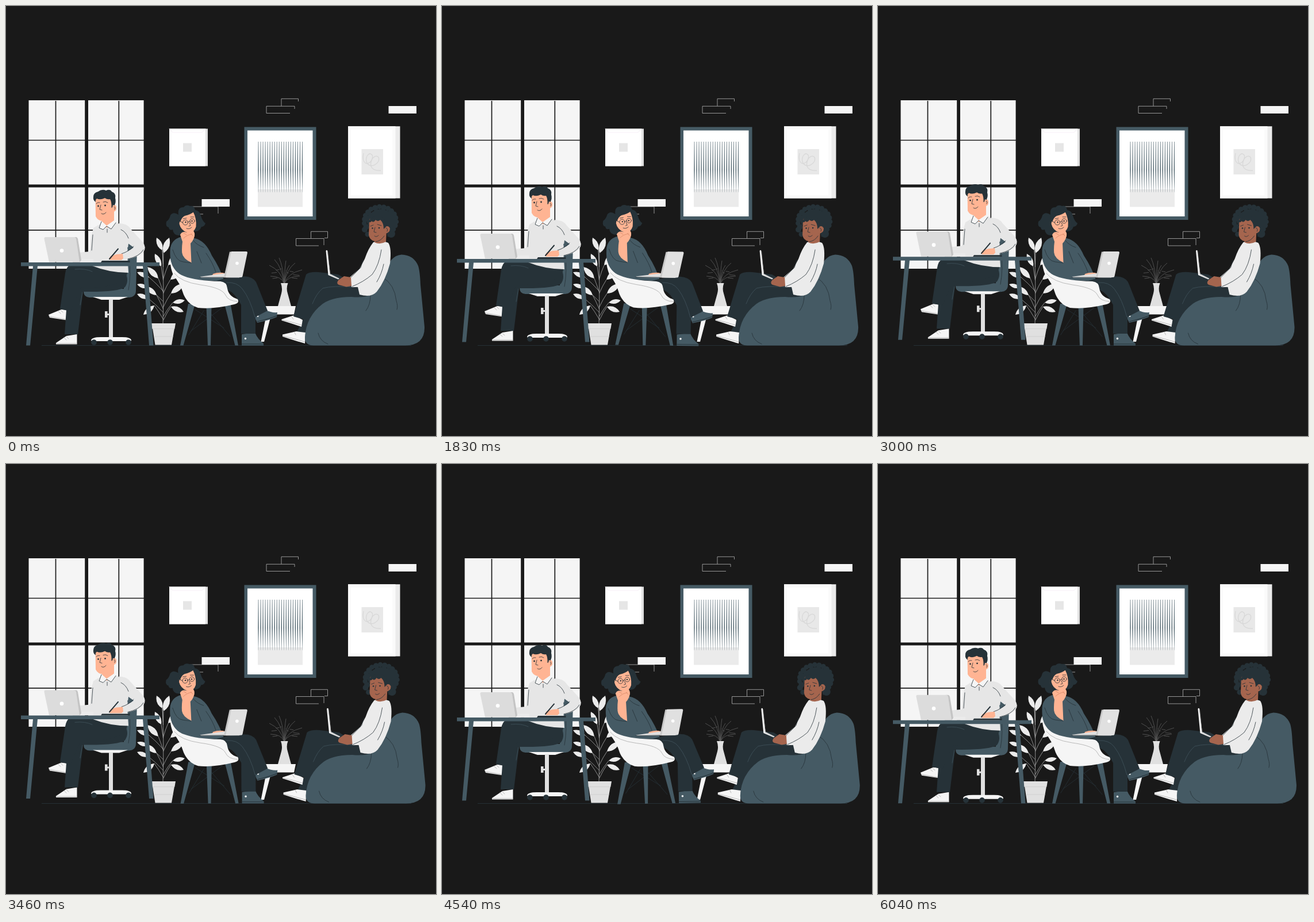
An HTML page that plays this animation: 748x748 px, repeating every 6.08 s.

```html
<!DOCTYPE html>
<html lang="en">
<head>
<meta charset="utf-8">
<title>Coworking</title>
<style>
  html, body { margin: 0; width: 100%; height: 100%; overflow: hidden; background: #191919; }
  svg { display: block; width: 100%; height: 100%; }
  .slate { fill: #455a64; } .dark { fill: #263238; }
  .white { fill: #f5f5f5; } .pale { fill: #ebebeb; } .grey { fill: #e0e0e0; } .shirt { fill: #e6e6e6; }
  .skin { fill: #ffb493; } .brown { fill: #a5654e; } .pure { fill: #fff; }
  .line { fill: none; stroke: #263238; stroke-width: .8; stroke-linecap: round; stroke-linejoin: round; }
  .soft { stroke: #aaa; } .seam { stroke: #41535c; } .blush { stroke: #d88968; }
  .brick { fill: none; stroke: #b5b5b5; stroke-width: .8; }
</style>
</head>
<body>
<svg viewBox="0 0 748 748">
  <!-- window -->
  <path class="white" d="M39.5 164H137.2V310.5H39.5zM143 164H239.6V310.5H143zM39.5 315.5H137.2V457H39.5zM143 315.5H239.6V457H143z"/>
  <path stroke="#191919" stroke-width="1.7" d="M86.5 165V457M196.3 165V457M39 233.5H240M39 389.8H240"/>

  <!-- bricks -->
  <path class="brick" d="M479 174V161.3H508.5V166M453 186.5V174.3H502V179M453 186.5H494M530.5 404V392.3H559.5V403.5H554M504.5 417V404.5H553V416M504.5 417H544M320 361V349H369V361M329 362H343"/>
  <path class="white" d="M665.5 174H714V187H665.5zM340.5 336H389V349H340.5z"/>

  <!-- pictures -->
  <path class="grey" d="M284 213.5H351V278.5H284z"/>
  <path class="pure" d="M284 213.5H347V278.5H284z"/>
  <path fill="none" stroke="#f6eff6" d="M284 213.5L290 220H341L347 213.5"/>
  <path fill="#e6e6e6" d="M308 238.5H323V253.5H308z"/>

  <path class="slate" d="M414.5 210.5H539.5V372H414.5z"/>
  <path class="pure" d="M420 216.5H533.5V366H420z"/>
  <path class="pale" d="M438 319H516V349.5H438z"/>
  <path class="slate" id="spikes"/>

  <path class="pale" d="M595 209.3H685.5V334.5H595z"/>
  <path fill="#fafafa" d="M595 209.3H677.5V334.5H595z"/>
  <path class="pure" d="M600 215H672V329H600z"/>
  <path fill="#e8e8e8" d="M618.5 249H656V293H618.5z"/>
  <path fill="none" stroke="#d8d8d8" stroke-width="1.3" d="M622 256C618 275 630 279 636 268C642 257 630 252 627 264C624 280 641 282 648 270C652 258 638 258 635 271C632 284 643 287 652 286"/>

  <path stroke="#263238" stroke-width=".9" d="M62 590.5H705"/>

  <!-- plant -->
  <path id="stems" fill="none" stroke="#bdbdbd" stroke-width=".7"/>
  <path id="leaves" class="pale"/>
  <path class="grey" d="M252.500 552H295L293.500 561H254zM255 561H293L288 589.500H259.500z"/>
  <path stroke="#c9c9c9" stroke-width=".7" d="M254 561.500H293.500M257 575H291"/>

  <!-- side table -->
  <path id="twigs" fill="none" stroke="#5c5c5c" stroke-width=".8"/>
  <path class="white" d="M450 522H504L501 536.500H461.500L449 584H443.500L453 536.500L447 531z"/>
  <path class="grey" d="M478 482H490.500Q487 491 490 500L496 522H473L479 500Q481.500 491 478 482z"/>

  <!-- man at the desk -->
  <g id="man">
    <path class="slate" d="M207 414Q210 404 219 406Q229 409 228 422L226 495Q226 506 214 507H145Q135 506 135 497Q150 490 205 492z"/>
    <path class="line" d="M213 494Q218 470 214 430"/>
    <path class="white" d="M151 506H212L197 511H166z"/>
    <path class="grey" d="M179 510H186V580H179zM172 531H176.500V535H180V538H176.500V542H172z"/>
    <path class="white" d="M148 581.500Q149 576 165 576H202Q217 576 218 581.500L217 583H149z"/>
    <path class="dark" id="wheels"/>
    <path class="white" d="M87 586L105 574L123.500 571V588.500H87zM74 537L96 528L111 529L115 548L76 542z"/>
    <path class="line soft" d="M101 577l4 4M105 575l4 4M91 531l4 4M95 529l4 4M87 587H123M75 540L114 547"/>
    <path class="dark" d="M128 460H205Q216 476 207 489Q195 498 134 497L125 571H102L107 500z"/>
    <path class="dark" d="M112 450H212Q214 470 201 480Q170 492 136 490Q131 488 129 492L112 531L94 527L103 465Q105 453 112 450z"/>
    <path class="line seam" d="M133 498L129 520M120 458Q138 456 150 462"/>
    <!-- far arm and torso -->
    <path class="shirt" d="M152 388Q147 398 146 427L126 429V441L150 447Q158 430 158 410z"/>
    <path class="shirt" d="M166 378L152 386Q148 400 149 425L150 452Q180 464 213 464L211 430L214 405L205 382L188 376z"/>
    <path class="slate" d="M211 420L224 417L214 434z"/>
    <path class="shirt" d="M196 378Q211 378 217 388L238 411Q245 420 239 428Q230 438 202 442L200 430Q212 428 222 420L207 409z"/>
    <path class="line" d="M200 389Q209 393 213 404M222 418Q214 427 201 431M149 425L151 398M239 424Q232 436 212 440"/>
    <!-- head -->
    <path class="skin" d="M166 368L168 382Q177 390 188 378V352z"/>
    <path class="white" d="M166 374L162 386L169 389L175 383L183 388L191 377L188 373L175 382z"/>
    <path class="line" d="M166 375L162 386L169 389L175 383L183 388L191 377M176 388V394"/>
    <path class="skin" d="M155.500 332L156 366Q160 374 169 374Q183 371 187 358Q193 357 192 349Q190 344 186 347L184 330Q170 326 155.500 332z"/>
    <path class="dark" d="M156 341Q151 338 152 332Q152 325 160 323Q167 318 174 321Q181 318 184 323Q192 326 190 334Q192 341 188.500 347L186 346Q185.500 351 183.500 351Q184 341 181 336Q176 337 172 334Q164 338 158 335Q155 337 156 341z"/>
    <path class="line" d="M157 344Q159 341 163 342M169 341Q173 339 177 342M165 346L163 354L167 355M166 361Q170 364 174 359M188 349Q191 350 189 354"/>
    <circle class="dark" cx="160.500" cy="348" r="1.400"/><circle class="dark" cx="172.500" cy="347" r="1.400"/>
    <!-- laptop and writing hand -->
    <path class="pale" d="M128 440H152V446H128z"/>
    <path fill="#c4c4c4" d="M118 402H122Q124 402 125 405L131 442L128 446H116z"/>
    <path fill="#dcdcdc" d="M69 402H119Q121 402 122 405L128 445.500H75L66.500 405Q66 402 69 402z"/>
    <circle class="pure" cx="97" cy="425.500" r="3.300"/>
    <path class="skin" d="M203 431L192 432L182 435Q178 439 181 442H201L204 439z"/>
    <path class="line" style="stroke-width:2" d="M195 422.500L180 440"/>
    <path class="dark" d="M167 443H215V446H165z"/>
    <!-- desk -->
    <path class="slate" d="M26 446H267V452.500H26zM47 452H55L42 590.500H35zM238 452H246L256.500 590.500H249z"/>
  </g>

  <!-- woman in the shell chair -->
  <g id="woman">
    <path class="line" d="M329 528L379 560M376 525L322 565M352 530L390 575M344 530L318 572"/>
    <path class="slate" d="M317 518H329L308.500 590.500H303zM348.500 522H357.500L356 590.500H351zM380 518H390.500L404 590.500H398.500z"/>
    <path class="slate" d="M410 571L433 568Q438 580 448 587V590.500H410zM431 538L452 529Q462 534 472 533L471 541Q460 546 437 551z"/>
    <path fill="none" stroke="#263238" d="M410 588H448M437 549Q458 544 471 539"/>
    <circle class="white" cx="416.500" cy="578.500" r="1.800"/><circle class="white" cx="438" cy="539.500" r="1.500"/>
    <!-- torso -->
    <path class="slate" d="M303 402Q287 407 285.500 424Q285 442 288 448Q296 468 312 476L380 479Q372 455 358 434Q347 408 328 404z"/>
    <path class="dark" d="M366 478Q400 468 421 471Q434 474 437 485L455 530L434 541V570H409V520Q396 495 382 493L362 488z"/>
    <path class="line seam" d="M384 481Q402 480 411 492Q425 510 433 541"/>
    <path class="white" d="M286 442Q292 464 310 470Q330 478 373 479Q384 480 385 491Q387 505 403 510Q407 517 397 519Q360 528 334 525Q317 520 309 502Q303 482 291 468Q285 453 286 442z"/>
    <path class="line soft" d="M293 465Q304 480 338 485Q376 490 382 503Q386 513 403 514"/>
    <!-- head -->
    <path class="dark" d="M300 363Q298 350 309 350Q313 345 320 348Q327 346 329 355Q337 356 339 365Q342 375 347 378Q345 384 340 384Q336 395 323 391L304 399Q291 400 290 389Q284 391 283 385Q277 384 279 375Q284 372 286 364Q291 357 300 363z"/>
    <path class="skin" d="M303 368Q312 364 325 357Q332 370 330.500 384Q327 396 315 394Q304 390 301.500 379z"/>
    <path class="dark" d="M303 376Q297 365 305 358Q315 350 328 357Q321 363 311 365Q306 367 303 376z"/>
    <g class="line">
      <circle cx="312" cy="376.500" r="4.500"/><circle cx="324" cy="374" r="4"/>
      <path d="M316.500 375.500L320 374.500M307.500 377L302 374M308 370L314 369M321 367L327 367M319 377L321 382L318 383M314 387Q319 389 323 385"/>
    </g>
    <circle class="dark" cx="312.500" cy="376" r="1.200"/><circle class="dark" cx="323.500" cy="374" r="1.200"/>
    <!-- resting arm -->
    <path class="skin" d="M303 398Q306 391 315 394L325 390Q329 394 328 400Q326 408 321 413L322.500 447L307 438Q305 424 307 410z"/>
    <path class="line blush" d="M309 404Q315 398 323 397M314 398L309 395M322 396L325 400"/>
    <path class="slate" d="M290 420L306 429Q308 440 322 446Q323 460 310 458Q296 450 290 437z"/>
    <path class="line" d="M290 424Q296 444 308 445L322 447M326 408Q332 416 344 420M332 427L340 447M348 430Q360 447 365 463"/>
    <path class="skin" d="M360 466Q371 462 381 465V471H358z"/>
    <!-- laptop -->
    <path class="grey" d="M337 471L381 465L408 470L406 472.500H340z"/>
    <path class="line" d="M337 472H382"/>
    <path fill="#c8c8c8" d="M389 427.500H416L406 472H379z"/>
    <path class="grey" d="M392 427H418Q420 427 420 429L411.500 470Q411 472 409 472H382z"/>
    <circle class="pure" cx="402" cy="447.500" r="2.800"/>
  </g>

  <!-- person on the beanbag -->
  <g id="guest">
    <path class="dark" d="M633 489L630 508Q580 512 550 535L521 572L506 567L528 523L560 490z"/>
    <path class="white" d="M479.500 545L501 538L516 546L514 558Q496 552 479.500 547zM481 571.500L505 566L521 568L520 587Q502 582 481 575z"/>
    <path class="line soft" d="M481 546Q498 550 514 555M482 574Q502 579 519 584M497 541l3 4M502 568l2 4"/>
    <path class="dark" d="M522 467Q528 462 544 463L578 467L610 487L637 499Q605 509 575 506L540 525L517 545L500 540z"/>
    <path class="line seam" d="M606 489Q568 486 551 491Q540 500 533 518"/>
    <path class="slate" d="M520 576Q522 540 551 518Q568 506 601 506Q624 508 634 502Q650 495 656 469Q667 434 688 432.500Q709 433 717 452Q720 461 721 485L728 558Q729 590.500 694 590.500H537Q519 591 520 576z"/>
    <path class="line" d="M634 503Q634 520 626 530M655 472Q676 484 679 513Q682 522 680 528M543 569Q546 583 560 588"/>
    <!-- torso and arm -->
    <path class="pale" d="M639 411Q630 422 624 440L615 457L598 472L601 489L612 489L615 502Q635 508 645 497Q660 478 668 448Q671 420 665 412Q652 406 639 411z"/>
    <path class="line" d="M653 424Q649 451 637 467Q622 480 602 488M599 473L617 455L621 442M645 480Q654 465 657 449"/>
    <path class="brown" d="M600 472L588 470L578 477Q574 483 579 485L592 488.500L601 487z"/>
    <!-- head -->
    <path class="dark" id="curls"/>
    <path class="brown" d="M642 397L641 411Q650 416 661 410L662 388z"/>
    <path class="brown" d="M632 371Q645 364 658 376L658 385Q665 380 668 387Q668 395 659 396Q655 408 641 409Q632 407 631 398z"/>
    <path class="dark" d="M630 375Q636 363 652 366Q663 372 661 384L657 388Q657 377 651 372Q647 376 643 372Q639 378 636 374Q634 378 630 375z"/>
    <path class="line" d="M634 383L639 381M646 380L653 382M642 385L640 393L644 394M641 400Q644 403 648 399M661 386Q665 387 663 392M643 410Q652 409 658 400"/>
    <circle class="dark" cx="637.500" cy="386.500" r="1.300"/><circle class="dark" cx="649" cy="386" r="1.300"/>
    <!-- laptop -->
    <path class="white" d="M556.500 426Q557 424 559 425L564 466L580 474L578 475.500L560.500 468z"/>
    <path class="line soft" d="M559.500 427L563.500 467L578 474"/>
  </g>
</svg>
<script>
const el = id => document.getElementById(id);
const draw = (id, d) => el(id).setAttribute('d', d);
const range = (n, f) => Array.from({ length: n }, (_, i) => f(i)).join('');
const ball = (x, y, r) => `M${x - r} ${y}a${r} ${r} 0 1 1 ${2 * r} 0a${r} ${r} 0 1 1 ${-2 * r} 0`;

draw('spikes', range(20, i => {
  const x = 439 + i * 4.02;
  return `M${x - .3} 236h.6L${x + .7} 285L${x + .1} 324h-.2L${x - .7} 285z`;
}));

// Each leaf runs from its base to its tip.
const leaf = ([x, y, u, v]) => {
  const dx = u - x, dy = v - y, mx = x + dx * .5, my = y + dy * .5, w = .36;
  return `M${x} ${y}Q${mx - dy * w} ${my + dx * w} ${u} ${v}Q${mx + dy * w} ${my - dx * w} ${x} ${y}z`;
};
const leaves = [
  [272, 425, 262, 403], [274, 430, 284, 403], [270, 453, 259, 431],
  [282, 451, 301, 429], [265, 474, 246, 454], [286, 476, 308, 458],
  [249, 472, 228, 463], [287, 500, 309, 483], [247, 490, 228, 484],
  [248, 509, 228, 501], [262, 503, 243, 488], [290, 516, 311, 512],
  [287, 523, 309, 532], [258, 521, 239, 537]
];
draw('leaves', leaves.map(leaf).join(''));
draw('stems', 'M273 553Q275 480 272 420' + leaves.map(([x, y]) =>
  `M273.500 ${Math.min(y + 24, 548)}Q${(x + 273) / 2} ${y + 10} ${x} ${y}`).join(''));

draw('twigs', [[458, 451], [460, 470], [467, 441], [475, 438], [487, 443], [503, 447], [515, 459], [511, 470], [493, 451]]
  .map(([x, y]) => {
    const mx = (x + 484) / 2, my = (y + 482) / 2 - 6;
    return `M484 483Q${484 + (x - 484) * .2} ${my} ${x} ${y}M${mx} ${my + 3}l${(x - 484) * .35} 1`;
  }).join(''));

draw('wheels', [153, 181, 213].map(x => ball(x, 585, 4.8)).join(''));

draw('curls', 'M625 370Q650 338 677 367Q684 390 664 402L658 378L630 381z' + range(16, i => {
  const a = (155 + i * 16) * Math.PI / 180, r = i % 2;
  return ball(651 + (27 + r) * Math.cos(a), 374 + (24 + r) * Math.sin(a), 5 - r * .7);
}) + ball(624, 389, 5) + ball(629, 397, 4.5) + ball(670, 396, 7));

const LOOP = 6080;
// Linear interpolation through [share of loop, value] keys.
const track = (keys, p) => {
  const i = keys.findIndex(k => k[0] > p);
  const [a, u] = keys[i - 1], [b, v] = keys[i];
  return u + (v - u) * (p - a) / (b - a);
};
const lift = [[0, 0], [.5, -10], [1, 0]];
const sway = [[0, 0], [.25, 1], [.75, -1], [1, 0]];
const shake = [0, -1, 2, -4, 4, -4, 4, -4, 2, -1, 0].map((x, i) => [i / 10, x]);
const start = performance.now();

function frame() {
  const p = (performance.now() - start) % LOOP / LOOP;
  el('man').setAttribute('transform', `translate(0 ${track(lift, p)})`);
  el('woman').setAttribute('transform', `rotate(${track(sway, p)} 375 468)`);
  el('guest').setAttribute('transform', `translate(${track(shake, p)} 0)`);
  requestAnimationFrame(frame);
}
frame();
</script>
</body>
</html>
```
